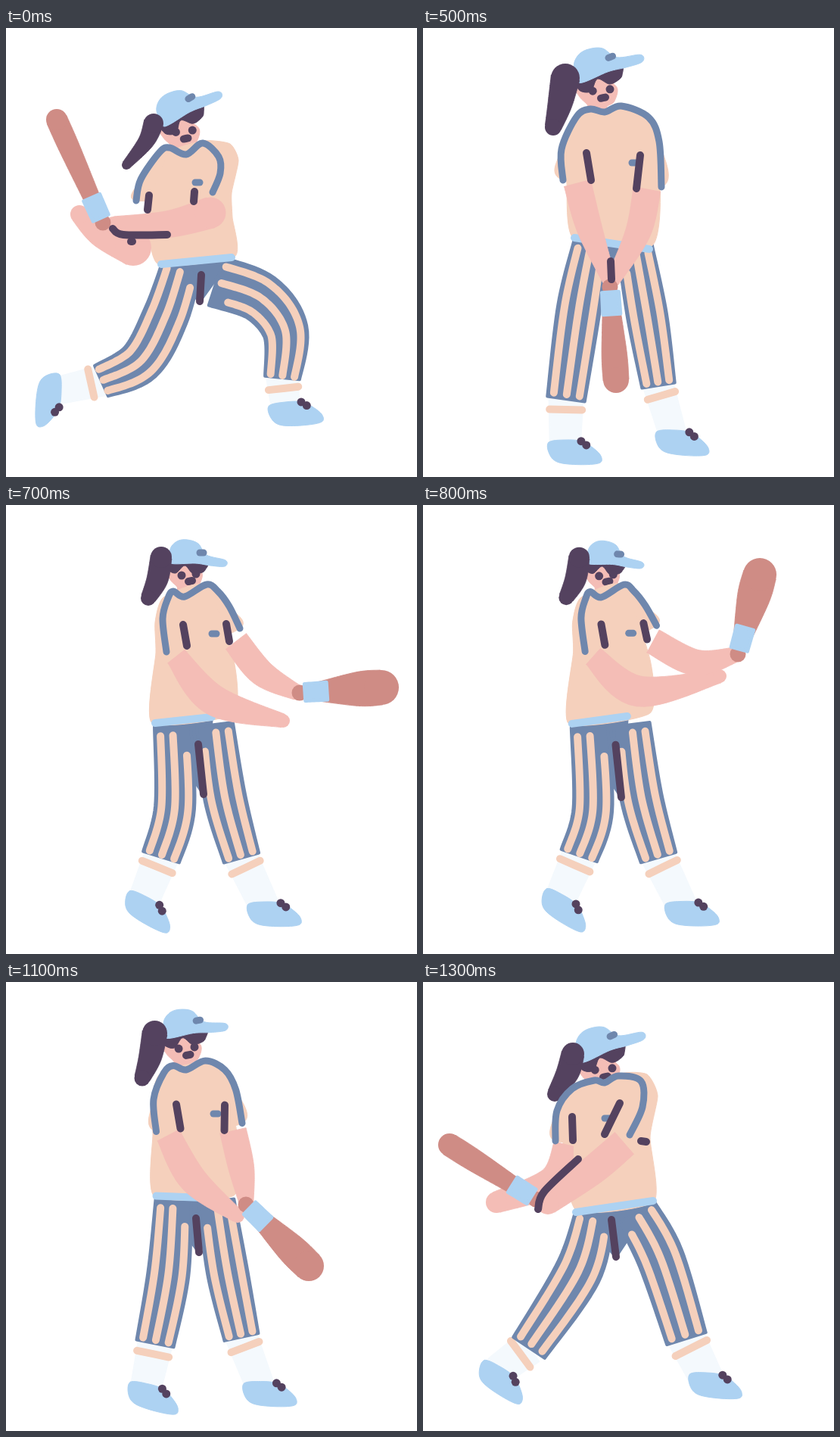
An HTML page with a canvas that plays this animation: 543 by 593 pixels, repeating every 1.4 s.

```html
<!DOCTYPE html>
<html lang="en">
<head>
<meta charset="utf-8">
<title>Batter</title>
<style>
html, body { margin: 0; width: 100%; height: 100%; overflow: hidden; background: #fff; }
canvas { display: block; width: 543px; height: 593px; }
</style>
</head>
<body>
<canvas id="stage" width="543" height="593"></canvas>
<script>
const ctx = document.getElementById('stage').getContext('2d');
const cream = '#f5d0bc', skin = '#f4bdb6', wood = '#cf8c85', navy = '#6f87ad',
  sky = '#add2f2', dark = '#54425f', white = '#f4f9fd';

// head: x, y, tilt, scale; feet: x, y, angle; bat: grip, tip, tip width.
// tail, legs and arms: x, y, width along the limb.
const windUp = {
  head: [229, 119, -30, 1.15],
  tail: [195, 126, 26, 185, 150, 21, 159, 181, 12],
  legs: [[232, 315, 52, 211, 380, 58, 178, 440, 56, 126, 466, 44],
    [278, 335, 66, 336, 356, 64, 369, 400, 58, 365, 462, 46]],
  feet: [[73, 480, 95], [369, 494, -3]],
  trim: [172, 228, 178, 200, 203, 164, 216, 158, 238, 167, 260, 152, 281, 170, 283, 192, 273, 217],
  body: [188, 240, 201, 312, 302, 302, 299, 250, 298, 218, 307, 175, 296, 153, 262, 149, 215, 166],
  belt: [205, 312, 298, 303],
  pocket: [253, 204],
  arms: [[97, 246, 24, 125, 272, 34, 168, 290, 48], [143, 264, 30, 215, 259, 35, 270, 244, 41]],
  bat: [128, 257, 67, 121, 28],
  marks: [[189, 221, 187, 240], [249, 216, 248, 229], [141, 265, 155, 273, 213, 273],
    [165, 282, 167, 282], [258, 326, 256, 361]]
};
const swing = {
  head: [232, 97, -24, 1.2],
  tail: [198, 95, 30, 191, 120, 30, 174, 148, 20],
  legs: [[226, 308, 50, 205, 383, 60, 140, 483, 50], [282, 305, 56, 314, 365, 60, 348, 471, 54]],
  feet: [[102, 508, 33], [375, 516, 6]],
  trim: [175, 210, 177, 170, 197, 141, 226, 130, 240, 133, 258, 124, 288, 131, 290, 165, 273, 202],
  body: [185, 215, 203, 302, 305, 290, 300, 205, 310, 150, 296, 122, 262, 121, 200, 150],
  belt: [202, 304, 304, 289],
  pocket: [243, 180],
  arms: [[186, 214, 26, 170, 262, 36, 97, 291, 28], [266, 213, 38, 225, 248, 38, 165, 292, 30]],
  bat: [149, 287, 35, 215, 30],
  marks: [[197, 178, 198, 209], [260, 160, 240, 201], [205, 234, 160, 277, 152, 300],
    [288, 210, 295, 211], [249, 314, 255, 363]]
};
const low = {
  head: [229, 64, -22, 1.2],
  tail: [188, 66, 38, 181, 100, 32, 172, 131, 22],
  legs: [[222, 285, 46, 206, 370, 56, 189, 490, 50], [280, 290, 46, 296, 380, 52, 311, 472, 44]],
  feet: [[188, 544, 2], [331, 531, 5]],
  trim: [185, 201, 183, 160, 203, 117, 221, 107, 240, 111, 262, 103, 298, 118, 312, 150, 315, 210],
  body: [203, 117, 190, 150, 190, 206, 199, 278, 302, 288, 313, 212, 290, 110],
  belt: [200, 277, 299, 292],
  pocket: [279, 178],
  arms: [[204, 205, 36, 220, 265, 33, 246, 333, 18], [296, 213, 36, 284, 270, 33, 250, 335, 18]],
  bat: [247, 342, 255, 465, 34],
  marks: [[216, 165, 222, 201], [287, 168, 282, 212], [248, 308, 249, 332]]
};
const hit = {
  head: [236, 77, 0, 1],
  tail: [205, 69, 28, 200, 98, 28, 188, 123, 20],
  legs: [[220, 292, 48, 223, 400, 52, 205, 465, 50], [276, 290, 48, 289, 385, 54, 311, 466, 48]],
  feet: [[185, 517, 30], [342, 524, 2]],
  trim: [212, 194, 207, 150, 214, 123, 221, 114, 236, 121, 265, 105, 280, 114, 295, 134, 309, 163],
  body: [208, 122, 197, 155, 198, 195, 193, 288, 300, 276, 301, 205, 265, 106],
  belt: [197, 288, 272, 280],
  pocket: [275, 170],
  arms: [[225, 200, 28, 275, 258, 40, 366, 285, 18], [304, 180, 34, 338, 222, 34, 385, 248, 20]],
  bat: [388, 248, 496, 241, 46],
  marks: [[234, 158, 239, 186], [291, 157, 295, 180], [254, 316, 261, 382]]
};

function blend(a, b, k) {
  if (typeof a === 'number') return a + (b - a) * k;
  if (Array.isArray(a)) return a.map((v, i) => blend(v, b[i], k));
  return Object.fromEntries(Object.keys(a).map(name => [name, blend(a[name], b[name], k)]));
}
const rise = { ...blend(low, hit, 0.5), bat: [317, 294, 400, 375, 40] };
const follow = {
  ...blend(low, hit, 1.08),
  arms: [[225, 200, 28, 285, 246, 40, 392, 226, 18], [304, 180, 34, 360, 208, 34, 412, 198, 20]],
  bat: [416, 197, 445, 92, 44]
};

// Shared shapes, placed by head or foot.
const cap = [-19, 0, -20, -13, -17, -23, -8, -30, 4, -31, 18, -26, 29, -11, 54, -4, 53, 4, 34, 3, 14, 0];
const face = [-21, 13, 0, 1, 22, 11, 20, 27, 12, 33, 11, 38, -8, 38, -10, 31, -18, 23];
const hair = [-23, 7, -18, -3, 28, -3, 27, 9, 20, 13, 10, 13, 0, 3, -12, 13];
const shoe = [-22, 4, 0, 0, 22, 1, 38, 10, 48, 20, 46, 29, 20, 32, -8, 30, -20, 20];

const split = (flat, size) =>
  Array.from({ length: flat.length / size }, (_, i) => flat.slice(i * size, (i + 1) * size));

function place(flat, [x, y, degrees, scale = 1]) {
  const a = degrees * Math.PI / 180, c = Math.cos(a) * scale, s = Math.sin(a) * scale;
  return split(flat, 2).map(([u, v]) => [x + u * c - v * s, y + u * s + v * c]);
}

// Smooth curve through the points; bend 0 gives straight edges.
function trace(points, closed, bend) {
  const n = points.length;
  const at = i => points[closed ? (i + n) % n : Math.max(0, Math.min(n - 1, i))];
  ctx.beginPath();
  ctx.moveTo(...points[0]);
  for (let i = 0; i < (closed ? n : n - 1); i++) {
    const [a, b, c, d] = [at(i - 1), at(i), at(i + 1), at(i + 2)];
    ctx.bezierCurveTo(
      b[0] + (c[0] - a[0]) * bend, b[1] + (c[1] - a[1]) * bend,
      c[0] - (d[0] - b[0]) * bend, c[1] - (d[1] - b[1]) * bend, c[0], c[1]);
  }
}
function blob(points, colour, bend = 1 / 6, edge = 1) {
  trace(points, true, bend);
  ctx.fillStyle = ctx.strokeStyle = colour;
  ctx.lineWidth = edge;
  ctx.fill();
  ctx.stroke();
}
function line(points, colour, width) {
  trace(points, false, 1 / 6);
  ctx.strokeStyle = colour;
  ctx.lineWidth = width;
  ctx.stroke();
}
function dot([x, y, size], colour) {
  ctx.beginPath();
  ctx.arc(x, y, size / 2, 0, 2 * Math.PI);
  ctx.fillStyle = colour;
  ctx.fill();
}

// Samples a limb as points with width and normal.
function spine(flat) {
  const keys = split(flat, 3), last = keys.length - 1, steps = 12, out = [];
  const key = i => keys[Math.max(0, Math.min(last, i))];
  for (let i = 0; i <= last * steps; i++) {
    const j = Math.min(last - 1, Math.floor(i / steps)), t = i / steps - j;
    const [a, b, c, d] = [key(j - 1), key(j), key(j + 1), key(j + 2)];
    out.push(b.map((v, n) => v + t / 2 * (c[n] - a[n] + t * (2 * a[n] - 5 * v + 4 * c[n] - d[n]
      + t * (3 * (v - c[n]) + d[n] - a[n])))));
  }
  return out.map(([x, y, w], i) => {
    const p = out[Math.max(0, i - 1)], q = out[Math.min(out.length - 1, i + 1)];
    const dx = q[0] - p[0], dy = q[1] - p[1], size = Math.hypot(dx, dy);
    return { x, y, w, nx: -dy / size, ny: dx / size };
  });
}
const side = (path, k) => path.map(p => [p.x + p.nx * p.w * k, p.y + p.ny * p.w * k]);
const ribbon = (path, colour, edge) =>
  blob([...side(path, 0.5), ...side(path, -0.5).reverse()], colour, 0, edge);

function limb(flat, colour, roundStart) {
  ribbon(spine(flat), colour, 1);
  dot(flat.slice(-3), colour);
  if (roundStart) dot(flat, colour);
}

function drawHead(head) {
  const [x, y, , scale] = head, upright = [x, y, 0, scale];
  blob(place(face, upright), skin);
  blob(place(hair, head), dark);
  const [left, right, ...mouth] = place([-4, 16, 15, 14, 5, 24, 10, 23], upright);
  dot([...left, 11], dark);
  dot([...right, 11], dark);
  line(mouth, dark, 10);
  blob(place(cap, head), sky);
  line(place([20, -14, 25, -14], head), navy, 9);
}

function drawFoot(foot, leg) {
  const [x, y, w] = leg.slice(-3), [[fx, fy]] = place([0, 7], foot);
  const size = Math.hypot(fx - x, fy - y), ux = (fx - x) / size, uy = (fy - y) / size;
  ribbon(spine([x, y, w * 0.9, fx, fy, w * 0.8]), white, 2);
  const bx = x + ux * 14, by = y + uy * 14, half = w * 0.43;
  line([[bx - uy * half, by + ux * half], [bx + uy * half, by - ux * half]], cream, 10);
  blob(place(shoe, foot), sky);
  for (const lace of place([21, 1, 28, 6], foot)) dot([...lace, 11], dark);
}

function drawLeg(leg, inner) {
  const path = spine(leg);
  ribbon(path, navy, 4);
  for (const k of [-1, 0, 1]) {
    const start = k === inner ? 5 : 2;
    line(side(path.slice(start, -1), k * 0.34), cream, 10);
  }
}

function drawBat([x, y, tx, ty, w]) {
  const size = Math.hypot(tx - x, ty - y);
  const along = d => [x + (tx - x) * d / size, y + (ty - y) * d / size];
  limb([...along(12), 20, ...along(size * 0.7), w * 0.97, tx, ty, w], wood);
  dot([x, y, 21], wood);
  ribbon(spine([...along(7), 22, ...along(36), 23]), sky, 5);
}

function draw(p) {
  ctx.fillStyle = '#fff';
  ctx.fillRect(0, 0, 543, 593);
  ctx.lineCap = ctx.lineJoin = 'round';
  const belt = split(p.belt, 2), trim = split(p.trim, 2);
  const fly = p.marks[p.marks.length - 1].slice(-2);

  drawHead(p.head);
  p.feet.forEach((foot, i) => drawFoot(foot, p.legs[i]));
  blob([...belt, fly], navy, 0, 4);
  drawLeg(p.legs[0], -1);
  drawLeg(p.legs[1], 1);
  blob(trim, cream);
  blob(split(p.body, 2), cream, 0.1);
  line(belt, sky, 10);
  const [px, py] = p.pocket;
  line([[px - 3, py], [px + 3, py]], navy, 9);
  limb(p.tail, dark, true);
  for (const arm of p.arms) limb(arm, skin, p === windUp);
  line(trim, navy, 9);
  drawBat(p.bat);
  for (const mark of p.marks) line(split(mark, 2), dark, 10);
}

// One pose per 100 ms.
const order = [windUp, windUp, windUp, windUp, swing, low, rise, hit, follow, follow, hit, rise, low, swing];

function tick() {
  draw(order[Math.floor(performance.now() % 1400 / 100)]);
  requestAnimationFrame(tick);
}
tick();
</script>
</body>
</html>
```
